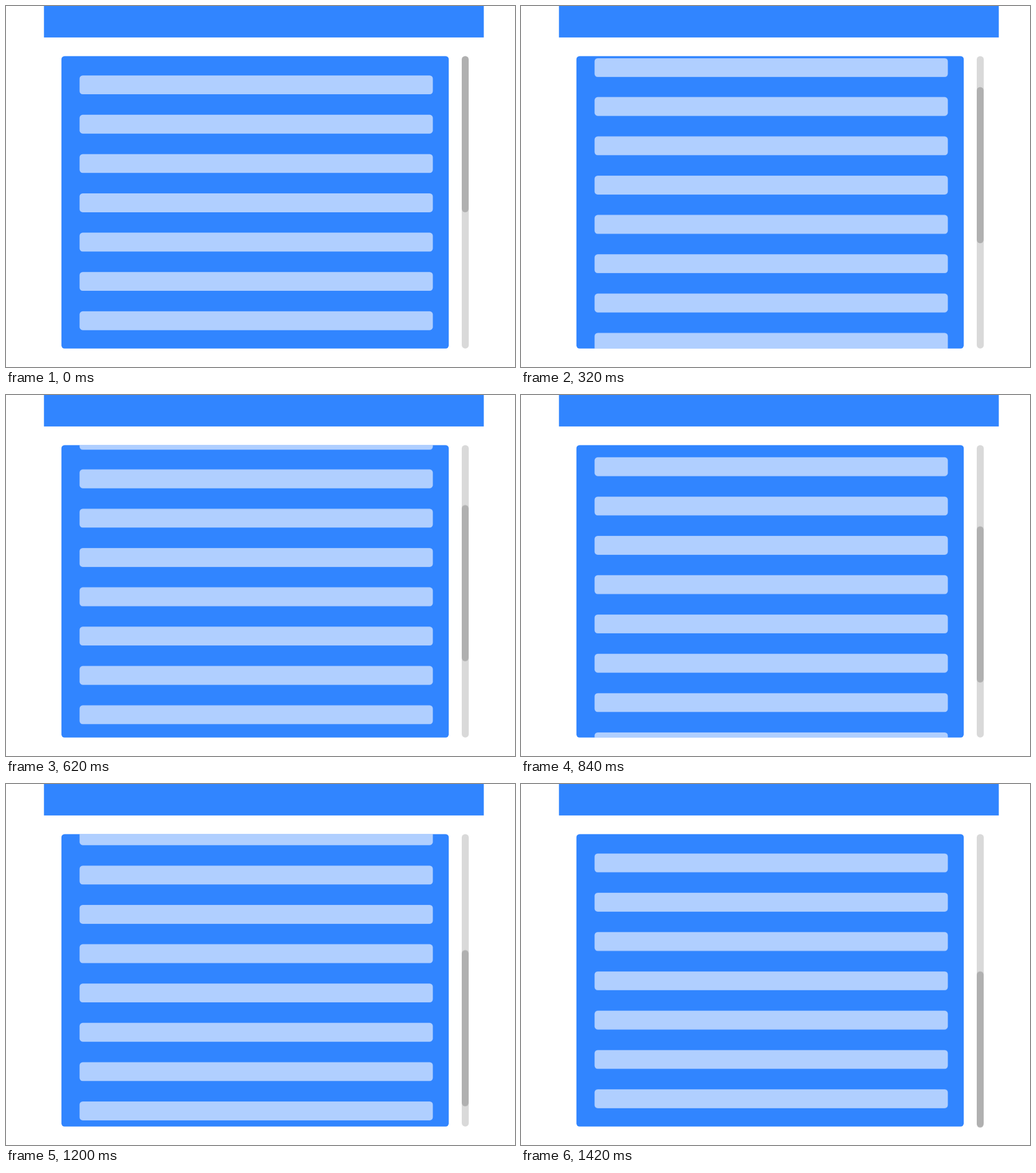
Animation, 889 px wide and 630 px high, one loop 1440 ms. Source, as an HTML page:

```html
<!DOCTYPE html>
<html lang="en">
<head>
<meta charset="utf-8">
<title>Scrolling list</title>
<style>
  html, body { margin: 0; width: 100%; height: 100%; overflow: hidden; background: #fff; }
  svg { display: block; width: 889px; height: 630px; }
  .blue { fill: #3185ff; }
  .bar { fill: #b0cfff; }
  .track { fill: #d9d9d9; }
  .thumb { fill: #b0b0b0; }
  /* 72 ticks of 20 ms; the small negative delay keeps ticks off the sampling edge */
  .move { animation: scroll 1440ms steps(72, end) -1ms infinite; }
  .first { --end: -136.1px; }
  .rest { --end: -139.13px; }
  .thumb { --end: 242.9px; }
  @keyframes scroll {
    from { transform: translateY(0); }
    to { transform: translateY(var(--end)); }
  }
</style>
</head>
<body>
<svg viewBox="0 0 889 630">
  <defs>
    <clipPath id="view"><rect x="97" y="87.5" width="676.3" height="510.3"/></clipPath>
    <rect id="bar" class="bar" x="128.5" y="121.2" width="617" height="32.9" rx="5.5"/>
  </defs>
  <rect class="blue" x="66.3" y="-1" width="768.2" height="55.9"/>
  <rect class="blue" x="96.8" y="87.5" width="676.5" height="510.3" rx="5.5"/>
  <g clip-path="url(#view)">
    <g class="move first"><use href="#bar"/></g>
    <g class="move rest">
      <use href="#bar" y="68.6"/>
      <use href="#bar" y="137.2"/>
      <use href="#bar" y="205.8"/>
      <use href="#bar" y="274.4"/>
      <use href="#bar" y="343"/>
      <use href="#bar" y="411.6"/>
      <use href="#bar" y="480.2"/>
      <use href="#bar" y="548.8"/>
    </g>
  </g>
  <rect class="track" x="796" y="87.5" width="12.3" height="510.3" rx="6"/>
  <rect class="thumb move" x="796" y="87.5" width="12" height="272.4" rx="5.8"/>
</svg>
</body>
</html>
```
